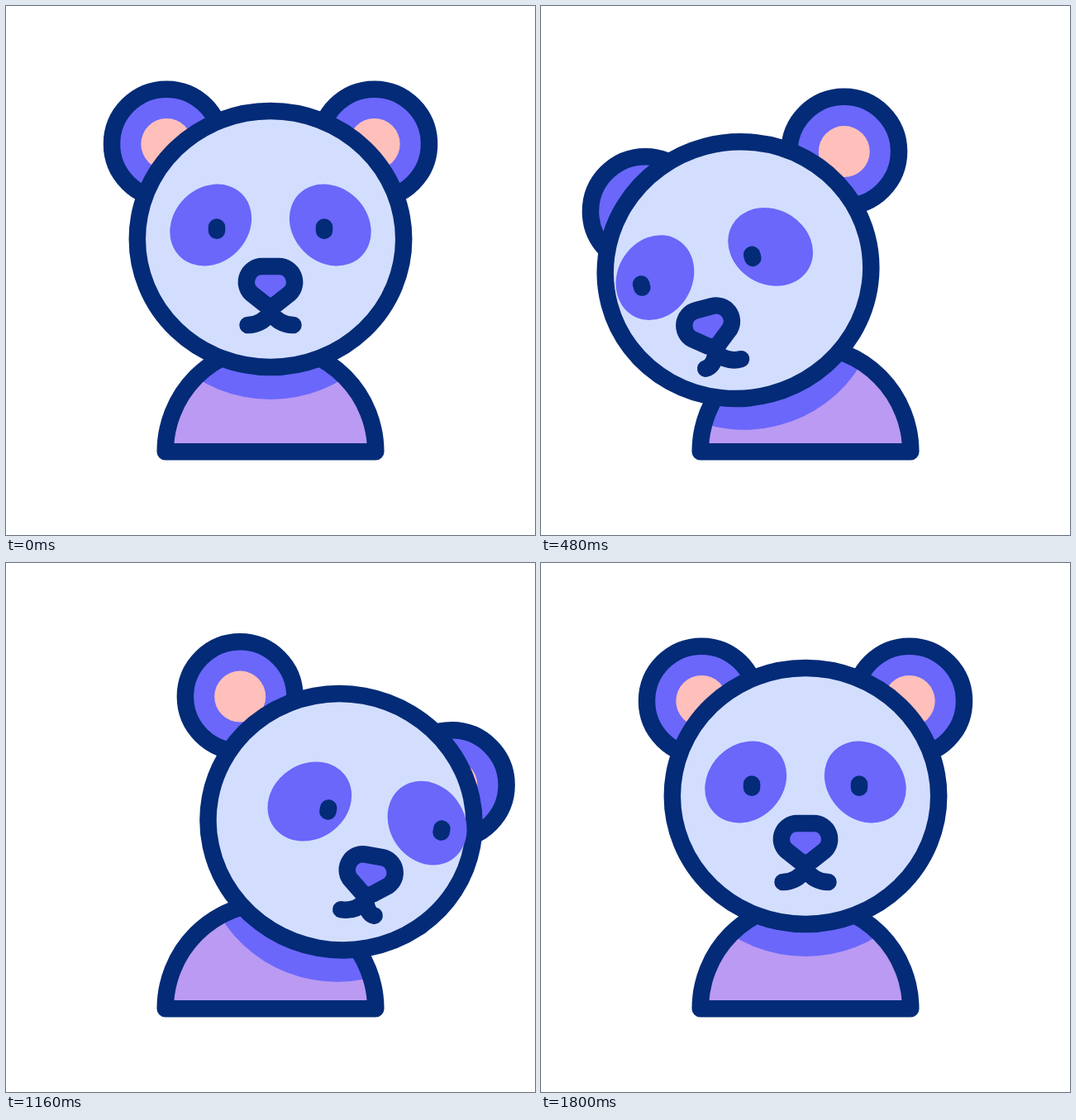
An HTML page for the animation above (2400 ms loop, 640 by 640 pixels).

```html
<!DOCTYPE html>
<html lang="en">
<head>
<meta charset="utf-8">
<title>Panda</title>
<style>
  html, body { margin: 0; width: 100%; height: 100%; overflow: hidden; background: #fff; }
  svg { display: block; width: 100%; height: 100%; }
  .line { fill: none; stroke: #032b77; stroke-width: 20.5; stroke-linecap: round; stroke-linejoin: round; }
  .purple { fill: #6a67fa; }
  .pink { fill: #ffbfba; }
  .face { fill: #d3defe; }
  .lilac { fill: #ba9af2; }
</style>
</head>
<body>
<svg viewBox="0 0 640 640">
  <defs>
    <path id="torso" d="M192.7 539.3A127.3 128 0 0 1 447.3 539.3Z"/>
    <clipPath id="inTorso"><use href="#torso"/></clipPath>
    <g id="ear">
      <circle class="line purple" r="66.3" style="fill:#6a67fa"/>
      <circle class="pink" r="31"/>
    </g>
  </defs>

  <use href="#torso" class="lilac"/>
  <g clip-path="url(#inTorso)">
    <g id="shade"><ellipse class="purple" cy="39" rx="161" ry="155"/></g>
  </g>
  <use href="#torso" class="line"/>

  <use id="earL" href="#ear"/>
  <use id="earR" href="#ear"/>

  <g id="head"><ellipse class="line" rx="161.2" ry="155" style="fill:#d3defe"/></g>

  <g id="patches">
    <ellipse class="purple" rx="53.3" ry="45.2" transform="translate(-72.3 0) rotate(-45)"/>
    <ellipse class="purple" rx="53.3" ry="45.2" transform="translate(72.3 0) rotate(45)"/>
  </g>
  <g id="eyes"><path id="pupils" class="line"/></g>
  <g id="muzzle">
    <path id="mouth" class="line"/>
    <path class="line" style="fill:#6a67fa"
      d="M-10 -19H10A19 19 0 0 1 23.4 13.6L7 26.6Q0 31 -7 26.6L-23.4 13.6A19 19 0 0 1 -10 -19Z"/>
  </g>
</svg>
<script>
const LOOP = 2400, PHASE = 600;
const MID = 0.6, EARLY = 0.143;   // eased progress at which the via values apply

// Offsets from rest: [via going left, left pose, via to right, right pose, via going back]
const tracks = {
  tilt:     [-9.3, -15.5, -11.9, 10.45, 6.3],
  headX:    [-52.5, -84.5, -58, 86, 54.2],
  headY:    [20.5, 39.7, 39.5, 31.2, 15.8],
  earLX:    [-47, -70, -50, 89.5, 53.5],
  earLY:    [49.5, 85, 75.5, -5.8, -7.4],
  earRX:    [-50, -82, -50, 94, 59],
  earRY:    [1.5, 10.2, 26.5, 101.8, 57.5],
  patchesX: [-72.1, -116.4, -80.8, 119.2, 74.3],
  patchesY: [23.4, 47.6, 43.6, 36.6, 17.4],
  eyesX:    [-84.3, -136.2, -95.5, 139.3, 86.5],
  eyesY:    [26, 54.2, 47.5, 41.5, 19.5],
  muzzleX:  [-76, -122.2, -85.5, 122.5, 76.5],
  muzzleY:  [25.9, 53, 47.9, 39.1, 18.4],
  spread:   [2.7, 4.5, 4.5, 4.7, 2.9],
  lipL:     [6.6, 11, 9.4, 0, 0],
  lipR:     [0, 0, 2, 14, 8.6]
};
const rest = {
  head: [320, 282], earL: [194.3, 167], earR: [445.7, 167],
  patches: [320, 265], eyes: [320, 269.6], muzzle: [320, 334]
};
const el = id => document.getElementById(id);

// cubic-bezier(2/3, 0, 1/3, 1)
function ease(x) {
  let lo = 0, hi = 1;
  for (let i = 0; i < 24; i++) {
    const s = (lo + hi) / 2, u = 1 - s;
    if (2 * u * u * s + u * s * s + s * s * s < x) lo = s; else hi = s;
  }
  return lo * lo * (3 - 2 * lo);
}

// Parabola from a to b that passes through via at progress k
function bend(a, via, b, k, p) {
  const line = q => a + (b - a) * q;
  return line(p) + (via - line(k)) * p * (1 - p) / (k * (1 - k));
}

function poseAt(t) {
  const phase = Math.floor(t / PHASE);
  const p = ease((t % PHASE) / PHASE);
  const pose = {};
  for (const [name, [v1, left, v2, right, v3]] of Object.entries(tracks)) {
    pose[name] =
      phase === 0 ? bend(0, v1, left, MID, p) :
      phase === 1 ? bend(left, v2, right, EARLY, p) :
      phase === 2 ? bend(0, v3, right, MID, 1 - p) : 0;
  }
  return pose;
}

function draw(t) {
  const pose = poseAt(t);
  for (const [id, [x, y]] of Object.entries(rest)) {
    const turn = id.startsWith('ear') ? 0 : pose.tilt;
    el(id).setAttribute('transform',
      `translate(${x + pose[id + 'X']} ${y + pose[id + 'Y']}) rotate(${turn})`);
  }
  el('shade').setAttribute('transform', el('head').getAttribute('transform'));

  const e = 65 + pose.spread;
  el('pupils').setAttribute('d', `M${-e} -2.1V2.1M${e} -2.1V2.1`);

  const l = 27.5 - pose.lipL, r = 27.5 - pose.lipR;
  el('mouth').setAttribute('d',
    `M${-l} 52Q${-l * 0.4} 52 0 37Q${r * 0.4} 52 ${r} 52`);
}

const start = performance.now();
function tick() {
  draw((performance.now() - start) % LOOP);
  requestAnimationFrame(tick);
}
tick();
</script>
</body>
</html>
```
